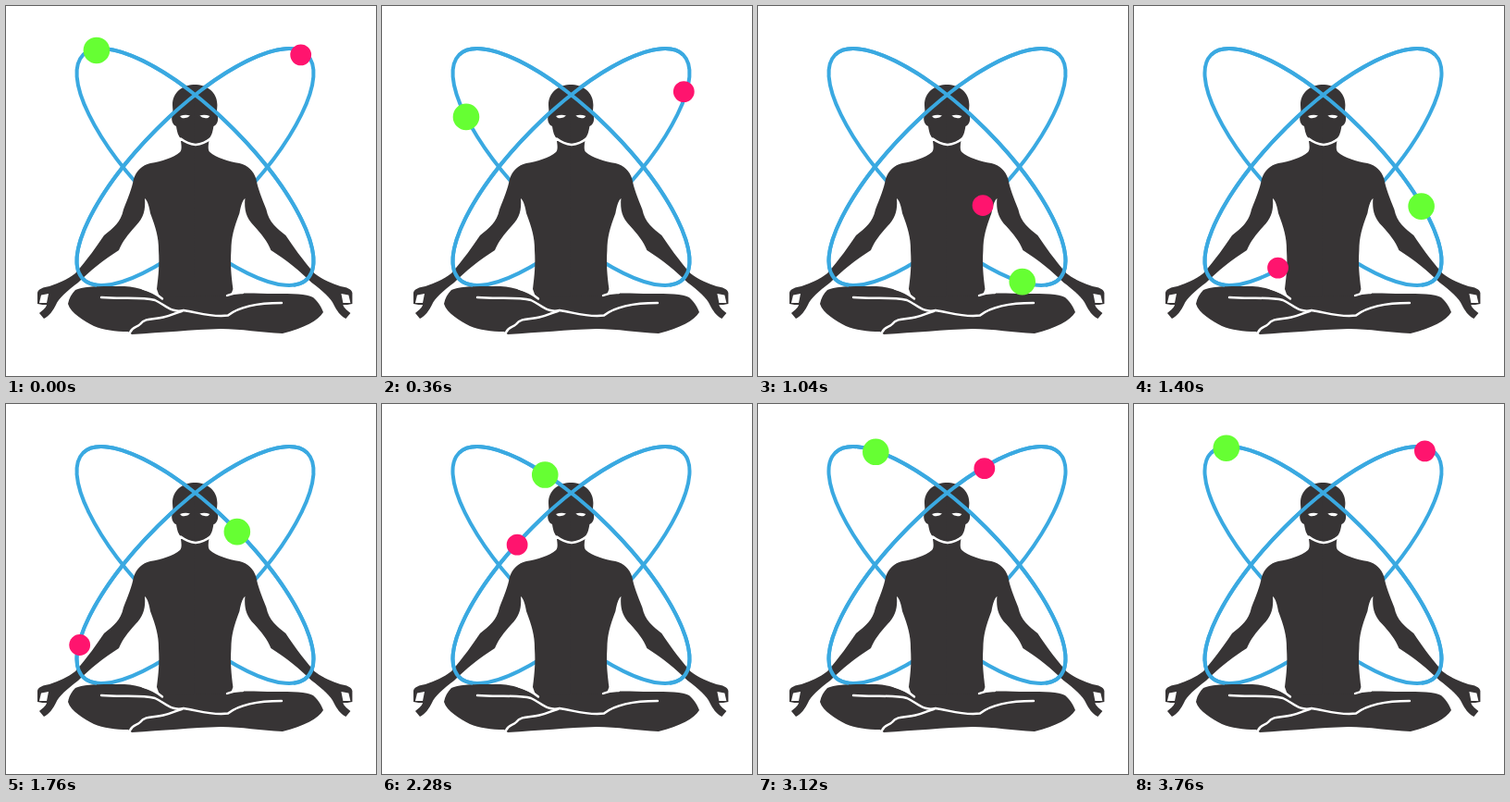
These frames come from a looping animation (400x400 px, 3800 ms). An HTML page:

```html
<!DOCTYPE html>
<html lang="en">
<head>
<meta charset="utf-8">
<title>Meditation orbits</title>
<style>
  html, body { margin: 0; width: 100%; height: 100%; overflow: hidden; background: #fff; }
  svg { display: block; width: 100vw; height: 100vh; }
  .ring { fill: none; stroke: #3aa9e1; stroke-width: 4; }
  .orbit { fill: none; }
  .body { fill: #373435; fill-rule: evenodd; }
  .crease { fill: none; stroke: #fff; stroke-width: 2.4; stroke-linecap: round; stroke-linejoin: round; }
</style>
</head>
<body>
<svg viewBox="0 0 400 400">
  <defs>
    <ellipse id="ring" rx="171.4" ry="58.3" class="ring"/>
    <path id="front" class="ring" d="M-171.4 0A171.4 58.3 0 1 1 165.6 15.1"/>
    <g id="half">
      <path class="body" d="M205 146H189C190 152 190 156 188 158C181 164 168 168 156 170
        C147 172 141 178 138 187C136 198 132 207 127 220C124 234 116 240 106 248
        C98 260 88 274 75 289C66 296 56 300 47 303C40 304 35 306 34 310L34 322
        C38 323 41 323 44 323C43 327 39 329 36 332L41 338C47 335 51 329 54 323
        C57 316 66 308 78 299C90 287 106 274 122 264C126 254 132 247 140 238
        C149 229 151 220 150 208C153 210 155 218 156 224C162 240 165 250 165 264
        C166 280 165 290 163 306L168 320H205Z
        M38 312.5L46 311L44 321L36 321Z"/>
      <path class="body" d="M205 85C191 85 180 93 180 107C180 111 181 114 180 118
        C178 122 180 129 184 130C185 136 186 141 190 144Q197 149 205 150Z"/>
      <path fill="#fff" d="M188 119Q194 116.8 199 118.6Q196 122 190 121Z"/>
    </g>
  </defs>
  <rect width="400" height="400" fill="#fff"/>
  <use href="#ring" transform="translate(204.5 174) rotate(45)"/>
  <use href="#ring" transform="translate(204.5 174) rotate(-45)"/>
  <use href="#half"/>
  <use href="#half" transform="translate(408.4 0) scale(-1 1)"/>
  <path class="body" d="M75 307C84 302 110 303 128 303C145 304 156 309 168 315L240 313
    C250 309 270 311 290 311C310 311 325 311 332 315C338 320 341 326 343 331
    C338 340 322 348 299 354C275 353 255 349 232 349C200 350 170 353 136 355L132 352
    C118 352 105 350 95 346C84 340 70 332 67 322C68 316 71 311 75 307Z"/>
  <g class="crease">
    <path d="M189 143.5Q196 149 205 150Q214 149 221 143.5"/>
    <path d="M148 305.5Q160 309 169 316.5"/>
    <path d="M239 313Q247 309.5 256 310"/>
    <path d="M103 315C125 317 146 314 161 318C172 323 178 332 192 329C207 331 222 337 240 334.5C252 325 272 321 298 321"/>
    <path d="M134 353C137 346 141 348 145 344C150 337 160 339 170 336.5C178 335 182 332 190 330"/>
  </g>
  <use href="#front" transform="translate(204.5 174) rotate(45)"/>
  <use href="#front" transform="translate(204.5 174) scale(-1 1) rotate(45)"/>
  <g id="pink" transform="translate(203.5 174.5) rotate(-45)">
    <ellipse class="orbit" rx="168" ry="57"/>
    <circle r="11.4" fill="#ff146e"/>
  </g>
  <g id="green" transform="translate(204 174.2) rotate(-135) scale(1 -1)">
    <ellipse class="orbit" rx="169.5" ry="58"/>
    <circle r="14.3" fill="#66ff33"/>
  </g>
</svg>
<script>
const LOOP = 3800, STEP = 40;

// Shared key times; each ball has the share of its orbit covered by then.
const times = [0, 0.147, 0.274, 0.463, 0.6, 0.737, 1];

// lead: distance in px from the starting point to the upper tip of the orbit
function makeBall(id, lead, shares) {
  const [orbit, dot] = document.getElementById(id).children;
  return { orbit, dot, lead, shares, length: orbit.getTotalLength() };
}

const balls = [
  makeBall("green", 15.5, [0, 0.186, 0.468, 0.761, 0.888, 0.939, 1]),
  makeBall("pink", 4.6, [0, 0.097, 0.258, 0.552, 0.723, 0.84, 1])
];

function secant(v, i) {
  return (v[i + 1] - v[i]) / (times[i + 1] - times[i]);
}

// The harmonic mean keeps the motion smooth without overshoot.
function slope(v, i) {
  const m = secant(v, Math.max(i - 1, 0));
  const n = secant(v, Math.min(i, v.length - 2));
  return 2 * m * n / (m + n);
}

function ease(v, x) {
  let i = 0;
  while (x >= times[i + 1]) i++;
  const h = times[i + 1] - times[i], s = (x - times[i]) / h, r = 1 - s;
  return v[i] * r * r * (1 + 2 * s) + v[i + 1] * s * s * (3 - 2 * s)
    + h * s * r * (slope(v, i) * r - slope(v, i + 1) * s);
}

function place(ball, x) {
  const { orbit, dot, lead, shares, length } = ball;
  const p = orbit.getPointAtLength((ease(shares, x) * length - lead + length) % length);
  dot.setAttribute("cx", p.x);
  dot.setAttribute("cy", p.y);
}

const start = performance.now();

function draw(now) {
  const t = Math.floor(Math.max(0, now - start) % LOOP / STEP) * STEP;
  balls.forEach(ball => place(ball, t / LOOP));
  requestAnimationFrame(draw);
}
draw(start);
</script>
</body>
</html>
```
